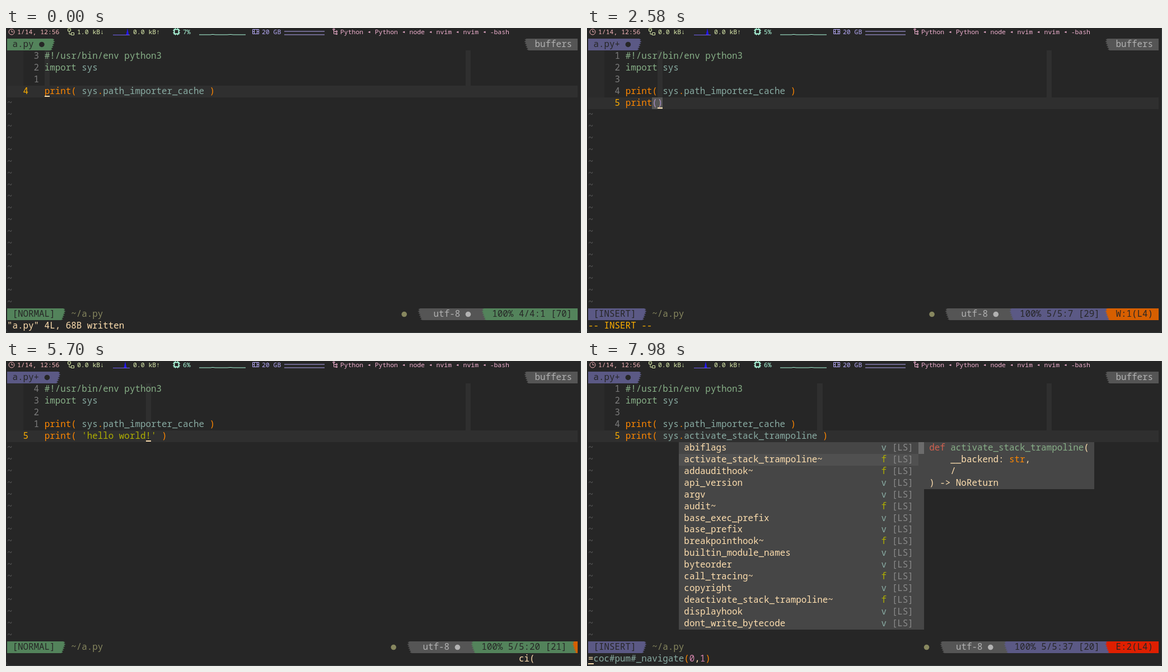
These frames come from a looping animation (1027 px wide and 545 px high, 8 s). An HTML page:

```html
<!DOCTYPE html>
<html lang="en">
<head>
<meta charset="utf-8">
<title>Editor session</title>
<style>
html, body { margin: 0; width: 100%; height: 100%; overflow: hidden; background: #262626; }
svg { display: block; }
text { white-space: pre; font: 15.87px "Noto Sans Mono", "DejaVu Sans Mono", monospace; font-variant-ligatures: none; }
text.bar { font-size: 11.45px; }
</style>
</head>
<body>
<svg id="stage" width="1027" height="545" viewBox="0 0 1027 545"></svg>
<script>
const stage = document.getElementById('stage');
const LOOP = 8000, CW = 9.52, RH = 20.96, X0 = 2, Y0 = 19, COLS = 107;
const C = {
  bg: '#262626', line: '#2f2f2f', sign: '#2b2b2b', menu: '#464646', pick: '#505050', thumb: '#6c6c6c',
  panel: '#555555', label: '#b2b2b2', fg: '#ffdfaf', gray: '#8a8a8a', num: '#7c7c7c', dim: '#585858',
  aqua: '#87af87', blue: '#89aca3', orange: '#ff8700', yellow: '#ffaf00', green: '#afaf00', red: '#d0604f',
  pink: '#d787af', olive: '#87875f', normal: '#53835b', insert: '#5b5985', warn: '#d75f00', error: '#df1f00',
  frame: '#3c4242'
};

// Cell drawing helpers
const px = c => Math.round(X0 + c * CW);
const py = r => Math.round(Y0 + r * RH);
const esc = s => s.replace(/&/g, '&amp;').replace(/</g, '&lt;');
const rect = (x, y, w, h, fill) => `<rect x="${x}" y="${y}" width="${w}" height="${h}" fill="${fill}"/>`;
const block = (r, c, rows, cols, fill) =>
  rect(px(c), py(r), px(c + cols) - px(c), py(r + rows) - py(r), fill);
const write = (r, c, runs) =>
  `<text x="${(X0 + c * CW).toFixed(2)}" y="${py(r) + 15}">` +
  runs.map(([s, fill]) => `<tspan fill="${fill}">${esc(s)}</tspan>`).join('') + '</text>';
const put = (r, c, s, fill) => write(r, c, [[s, fill]]);
const dot = (r, c, fill) => `<circle cx="${X0 + (c + 0.5) * CW}" cy="${Y0 + (r + 0.5) * RH}" r="4.8" fill="${fill}"/>`;
const cursor = (r, c) => rect(px(c), py(r + 1) - 3, px(c + 1) - px(c), 2, C.fg);

// Ragged edge of a status section; dir 1 points right, -1 points left
const SPIKES = [0.55, 0.9, 0.65, 1, 0.65, 0.9, 0.5, 0.8, 0.4, 0.65, 0.25, 0.5, 0.15];
function flame(r, c, fill, dir) {
  const base = dir > 0 ? px(c) : px(c + 1), top = py(r), h = py(r + 1) - top;
  const edge = SPIKES.map((v, i) => `${base + dir * v * CW},${top + h * i / (SPIKES.length - 1)}`);
  return `<polygon points="${base},${top} ${edge.join(' ')} ${base},${top + h}" fill="${fill}"/>`;
}

function paint(text, rules, base) {
  const re = new RegExp(rules.map(([src]) => `(${src})`).join('|'), 'g');
  const runs = [];
  let last = 0;
  for (const m of text.matchAll(re)) {
    if (m.index > last) runs.push([text.slice(last, m.index), base]);
    runs.push([m[0], rules[m.slice(1).findIndex(g => g !== undefined)][1]]);
    last = m.index + m[0].length;
  }
  runs.push([text.slice(last), base]);
  return runs;
}
const CODE = [['^#!.*', C.aqua], ["'[^']*'", C.green], ['\\bimport\\b', C.aqua],
  ['\\bprint\\b|[().]', C.orange], ['\\d', C.pink], ['[\\w#]+?(?=\\d|\\W|$)|#', C.blue]];
const DOC = [['\\bdef\\b', C.red], ['(?<=def )\\w+', C.aqua],
  ['\\b(?:str|None|object|bool|False)\\b|\\\\n', C.orange], ['"', C.green]];
const code = s => paint(s, CODE, C.fg);
const doc = s => paint(s, DOC, C.fg);

const FILE = ['#!/usr/bin/env python3', 'import sys', '', 'print( sys.path_importer_cache )'];
const overload = (file, flush) => ['def print(', '    *values: object,', '    sep: str | None = " ",',
  String.raw`    end: str | None = "\n",`, `    file: ${file}[str] | None = None,`,
  `    flush: ${flush}`, ') -> None: ...'];

const MENUS = {
  print: {
    col: 6, kind: 42, thumb: 7,
    items: `print~ f LS|print f JD|property C LS|prefix v LS sys|property C JD|prepare_class~ f LS types
ProcessLookupError C LS|ProfileFunction~ v LS _typeshed|Protocol~ C LS typing|Protocol~ C LS typing_extensions
ProcessLookupError C JD|_promote~ v LS typing|_ProtocolMeta~ C LS typing|purge~ f LS re|ParamSpec~ C LS typing
ParamSpec~ C LS typing_extensions`.split(/[|\n]/).map(s => s.split(' ')),
    doc: [...overload('SupportsWrite', 'Literal[False] = False'), '', ...overload('_SupportsWriteAndFlush', 'bool')]
  },
  sys: {
    col: 17, kind: 55, thumb: 1,
    items: `abiflags activate_stack_trampoline~ addaudithook~ api_version argv audit~ base_exec_prefix base_prefix
breakpointhook~ builtin_module_names byteorder call_tracing~ copyright deactivate_stack_trampoline~ displayhook
dont_write_bytecode`.split(/\s+/).map(w => [w, w.endsWith('~') ? 'f' : 'v', 'LS']),
    doc: ['def activate_stack_trampoline(', '    __backend: str,', '    /', ') -> NoReturn']
  }
};
const KIND = { f: C.green, C: C.orange, v: C.blue };

// Timeline: each step changes some fields of the state
const steps = [];
const at = (t, change) => steps.push([t, change]);
const edit = (t, before, after = '', more = {}) => at(t, { line: before + after, col: before.length, ...more });
function typing(t, gap, text, before, after) {
  [...text].forEach((_, i) => edit(t + i * gap, before + text.slice(0, i + 1), after));
}
const INS = '-- INSERT --';

at(0, { ins: false, line: null, col: 0, tick: 70, diag: null, menu: null, query: '', pick: -1, sig: false,
  match: false, cmd: '"a.py" 4L, 68B written', keys: '', bar: [1, 0, 7, 217] });
edit(240, '', '', { ins: true, cmd: INS, tick: 0 });
edit(660, 'p');
edit(840, 'pr');
at(900, { menu: 'print', query: 'pr', pick: 0 });
['pri', 'prin', 'print'].forEach((s, i) => edit(1140 + i * 240, s, '', { query: s }));
at(1800, { diag: 'W:1(L4)', tick: 29 });
edit(2520, 'print(', ')', { menu: null, match: true });
edit(2760, 'print( ', ' )', { match: false });
at(2880, { sig: true });
edit(2940, "print( '", "' )");
at(3000, { diag: '', tick: 27 });
typing(3060, 120, 'hello ', "print( '", "' )");
typing(3840, 120, 'wor', "print( 'hello ", "' )");
typing(4140, 120, 'ld!', "print( 'hello wor", "' )");
edit(4560, "print( 'hello world", "!' )", { ins: false, sig: false, cmd: '' });
at(4800, { tick: 21 });
at(5400, { keys: 'c' });
at(5520, { keys: 'ci' });
at(5640, { keys: 'ci(' });
edit(5760, 'print(', ')', { ins: true, keys: '', cmd: INS, match: true });
edit(6120, 'print( ', ' )', { match: false, tick: 20 });
typing(6240, 120, 'sys.', 'print( ', ' )');
at(6780, { menu: 'sys', query: '', pick: -1 });
at(7080, { diag: 'E:2(L4)' });
edit(7260, 'print( sys.abiflags', ' )', { pick: 0 });
edit(7560, 'print( sys.activate_stack_trampoline', ' )', { pick: 1 });
at(7800, { cmd: '=coc#pum#_navigate(0,1)' });
[[900, 0, 1, 6, 216], [1800, 0, 0, 5, 215], [2700, 0, 0, 6, 214], [3600, 0, 0, 7, 214], [4500, 0, 0, 6, 213],
  [6300, 0, 0, 5, 212], [7200, 0, 0, 6, 212]].forEach(([t, ...bar]) => at(t, { bar }));
steps.sort((a, b) => a[0] - b[0]);

function drawBar([down, up, cpu, spike]) {
  const label = (x, s, fill) => `<text class="bar" x="${x}" y="11" fill="${fill}">${s}</text>`;
  const stroke = (d, color, width = 1) => `<path d="${d}" fill="none" stroke="${color}" stroke-width="${width}"/>`;
  const rose = '#f5b5b9', lime = '#dfefaf', mint = '#afffdf', lilac = '#b4a8f5', pink = '#f0b0cf';
  return stroke('M15 7a5 5 0 1 1-10 0a5 5 0 1 1 10 0M10 4v3h3', rose) + label(20, '1/14, 12:56', rose) +
    stroke('M110.5 1.5h5v4h-5zM116.5 8.5h5v4h-5zM113 6v5h3', lime) +
    label(127, `${down}.0 kB↓`, lime) + label(227, `${up}.0 kB↑`, lime) +
    stroke('M191 12.5H221', '#7060ef') +
    `<path d="M${spike - 2.5} 12L${spike} 1l2.5 11z" fill="#2418f0"/>` +
    stroke('M300.5 2.5h8v8h-8z', mint, 2) +
    stroke('M298 4.5h2M298 8.5h2M309 4.5h2M309 8.5h2M302.5 0v2M306.5 0v2M302.5 11v2M306.5 11v2', mint) +
    label(316, cpu + '%', mint) + stroke('M345 12H365l4-.6 5 .6H395l6-.5 5 .5H428', mint) +
    stroke('M440.5 2.5h11v8h-11zM443.5 2v9M448.5 2v9M441 6.5h2M449 6.5h2', lilac) +
    label(457, '20 GB', lilac) + stroke('M497 6H569M497 12H569', lilac) +
    stroke('M585.5 4v6.5h4M585.5 6.5h4M584 1.5h3v2h-3zM589.5 5h2v2.5h-2zM589.5 9.5h2v2h-2z', pink) +
    label(597, 'Python ◂ Python ◂ node ◂ nvim ◂ nvim ◂ -bash', pink);
}

function drawTabs(mod) {
  const fill = mod ? C.insert : C.normal, name = mod ? 'a.py+' : 'a.py', end = name.length + 4;
  return block(0, 0, 1, end, fill) + flame(0, end, fill, 1) + put(0, 1, name, C.bg) + dot(0, end - 2, C.bg) +
    flame(0, 97, C.panel, -1) + block(0, 98, 1, 9, C.panel) + put(0, 99, 'buffers', C.label);
}

function drawText(s) {
  const lines = s.line === null ? FILE : [...FILE, s.line], n = lines.length;
  let out = block(1, 0, n - 1, 3, C.sign) + block(1, 86, n - 1, 1, C.line) +
    block(1, 7 + s.col, n - 1, 1, C.line) + block(n, 0, 1, COLS, C.line);
  if (s.match) out += block(n, 6 + s.col, 1, 2, C.panel);
  lines.forEach((text, i) => {
    const row = i + 1, here = row === n;
    out += put(row, here && !s.ins ? 3 : 5, String(s.ins || here ? row : n - row), here ? C.yellow : C.num);
    out += write(row, 7, code(text));
  });
  if (s.match) out += put(n, 6 + s.col, '()', '#8787d7');
  for (let r = n + 1; r < 23; r++) out += put(r, 0, '~', C.dim);
  return out + (s.cmd[0] === '=' ? cursor(24, 0) : cursor(n, 7 + s.col));
}

function drawStatus(s) {
  const mode = s.ins ? C.insert : C.normal, n = s.line === null ? 4 : 5;
  const info = `100% ${n}/${n}:${s.col + 1} [${s.tick}]`;
  const end = s.diag === null ? 106 : s.diag ? 96 : 105, c = end - info.length;
  let out = block(23, 0, 1, 10, mode) + flame(23, 10, mode, 1) +
    put(23, 1, s.ins ? '[INSERT]' : '[NORMAL]', C.bg) + put(23, 12, '~/a.py', C.olive) +
    dot(23, c - 17, C.olive) + flame(23, c - 14, C.panel, -1) + block(23, c - 13, 1, 12, C.panel) +
    put(23, c - 11, 'utf-8', C.label) + dot(23, c - 5, C.label) +
    flame(23, c - 2, mode, -1) + block(23, c - 1, 1, COLS - c + 1, mode) + put(23, c, info, C.bg);
  if (s.diag !== null) {
    const fill = s.diag[0] === 'E' ? C.error : C.warn;
    out += flame(23, end + 1, fill, -1);
    if (s.diag) out += block(23, end + 2, 1, COLS - end - 2, fill) + put(23, 99, s.diag, C.bg);
  }
  const cmd = s.cmd === INS ? [[s.cmd, C.yellow]] : s.cmd[0] === '=' ? code(s.cmd) : [[s.cmd, C.fg]];
  return out + write(24, 0, cmd) + put(24, 96, s.keys, C.fg);
}

// Letters of the query found in order are tinted; null when the word does not match
function fuzzy(word, query) {
  let k = 0;
  const runs = [...word].map(ch => k < query.length && ch.toLowerCase() === query[k] ? (k++, [ch, C.blue]) : [ch, C.fg]);
  return k === query.length ? runs : null;
}

function drawMenu(s) {
  const m = MENUS[s.menu], bar = m.kind + 7;
  const items = m.items.map(([word, kind, src, from]) => ({ runs: fuzzy(word, s.query), kind, src, from }))
    .filter(item => item.runs);
  let out = block(6, m.col, items.length, bar + 1 - m.col, C.menu);
  if (s.pick >= 0) out += block(6 + s.pick, m.col, 1, bar - m.col, C.pick);
  if (items.length > 12) out += block(6, bar, m.thumb, 1, C.thumb);
  items.forEach(({ runs, kind, src, from }, i) => {
    out += write(6 + i, m.col + 1, from ? [...runs, [' ' + from, C.gray]] : runs) +
      put(6 + i, m.kind, kind, KIND[kind]) + put(6 + i, m.kind + 2, `[${src}]`, C.gray);
  });
  if (s.menu === 'print' || s.pick === 1) {
    const width = Math.max(...m.doc.map(l => l.length)) + 2;
    out += block(6, bar + 1, m.doc.length, width, C.menu);
    m.doc.forEach((l, i) => out += write(6 + i, bar + 2, doc(l)));
  }
  return out;
}

function drawSignature() {
  const rest = String.raw`, sep: str | None = " ", end: str | None = "\n", file:`;
  return block(1, 12, 4, 80, C.menu) + block(1, 91, 3, 1, C.thumb) +
    write(1, 13, [['(', C.fg], ['*values: object', C.gray], ...doc(rest)]) +
    write(2, 13, doc('SupportsWrite[str] | None = None, flush: Literal[False] = False) -> None')) +
    rect(px(13), 93, px(91) - px(13), 1, C.gray) +
    write(4, 13, doc('(*values: object' + rest)) + put(4, 88, '@@@', '#626262');
}

// Rounded lower edge of the terminal window
const windowEdge = `<path d="M1026.5 0V538q0 6.5-6.5 6.5H7q-6.5 0-6.5-6.5" fill="none" stroke="${C.frame}"/>`;

function render(s) {
  stage.innerHTML = drawBar(s.bar) + drawTabs(s.line !== null) + drawText(s) + drawStatus(s) +
    (s.menu ? drawMenu(s) : '') + (s.sig ? drawSignature() : '') + windowEdge;
}

let shown = 0;
function tick() {
  const t = performance.now() % LOOP;
  const count = steps.filter(([start]) => start <= t).length;
  if (count !== shown) {
    shown = count;
    render(Object.assign({}, ...steps.slice(0, count).map(step => step[1])));
  }
  requestAnimationFrame(tick);
}
tick();
</script>
</body>
</html>
```
